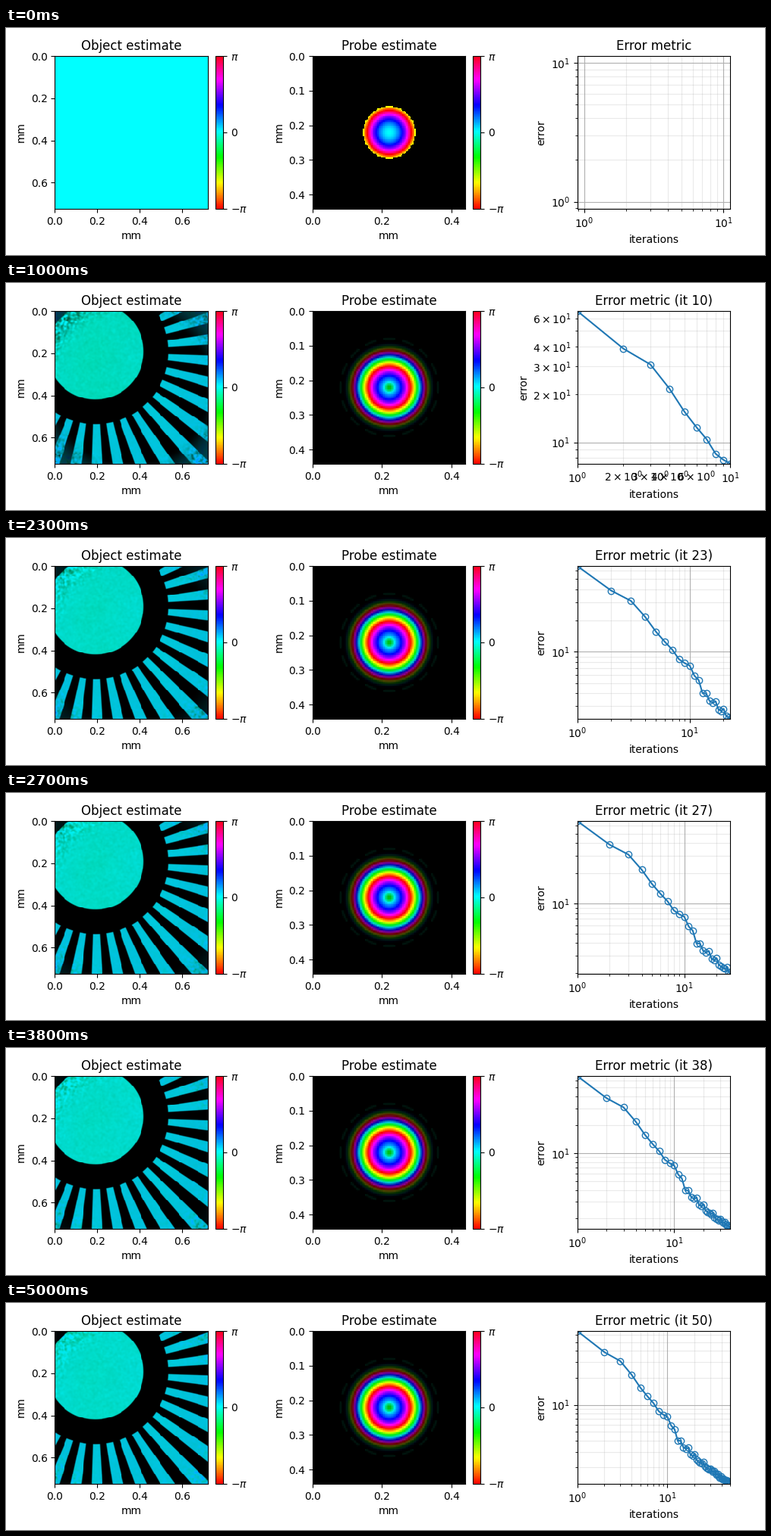
A matplotlib script for the animation above (5.1 s loop, 1000 by 300 pixels).

```python
import numpy as np
import matplotlib.pyplot as plt
from matplotlib.animation import FuncAnimation
from matplotlib.cm import ScalarMappable
from matplotlib.colors import Normalize, hsv_to_rgb

W, H, FRAMES = 1000, 300, 51
TOP, SIDE = 37.1, 201.7
plt.rcParams["font.family"] = "DejaVu Sans"

ERRORS = np.array([
    66.6, 38.7, 30.8, 21.7, 15.6, 12.45, 10.45, 8.49, 7.77, 7.35,
    5.87, 5.34, 3.98, 3.97, 3.36, 3.23, 3.33, 2.78, 2.69, 2.83,
    2.43, 2.34, 2.27, 2.21, 2.29, 2.06, 1.98, 1.95, 1.91, 1.95,
    1.86, 1.79, 1.82, 1.72, 1.66, 1.70, 1.60, 1.55, 1.59, 1.52,
    1.48, 1.50, 1.45, 1.43, 1.46, 1.40, 1.42, 1.37, 1.35, 1.32])


def grid(n, x0, y0):
    """Pixel offsets from a centre given relative to the panel corner."""
    p = (np.arange(n) + 0.5) * SIDE / n
    return np.meshgrid(p - x0, p - y0)


def smoothstep(lo, hi, x):
    t = np.clip((x - lo) / (hi - lo), 0, 1)
    return t * t * (3 - 2 * t)


def smooth_noise(rng, n, sigma):
    f = np.fft.fftfreq(n)
    kernel = np.exp(-2 * (np.pi * sigma) ** 2 * (f[:, None] ** 2 + f ** 2))
    field = np.fft.ifft2(np.fft.fft2(rng.standard_normal((n, n))) * kernel).real
    return field / field.std()


def to_rgb(hue_deg, value):
    hue = np.mod(hue_deg / 360, 1)
    return hsv_to_rgb(np.dstack([hue, np.ones_like(hue), np.clip(value, 0, 1)]))


# Object: a disc inside a ring of spokes, uncertain in the corners
N_OBJ = 210
PITCH = 2 * np.pi / 34
rng = np.random.default_rng(4)
fine_a, fine_b = (smooth_noise(rng, N_OBJ, 1.2) for _ in range(2))
coarse = smooth_noise(rng, N_OBJ, 14)
ox, oy = grid(N_OBJ, 53.7, 53.4)
o_rad, o_ang = np.hypot(ox, oy), np.arctan2(oy, ox)
disc = 1 - smoothstep(62.5, 64.5, o_rad)
turn = np.mod(o_ang - np.radians(4.5) + PITCH / 2, PITCH) - PITCH / 2
spokes = (smoothstep(-1, 1, o_rad * (PITCH / 4 - np.abs(turn)))
          * smoothstep(95, 97, o_rad))
shape = disc + spokes
cx, cy = grid(N_OBJ, SIDE / 2, SIDE / 2)
corner = smoothstep(92, 142, np.hypot(cx, cy))


def object_image(n):
    if n == 0:
        return to_rgb(np.full((N_OBJ, N_OBJ), 180.0), np.ones((N_OBJ, N_OBJ)))
    doubt = np.exp(-n / (0.9 + 16 * corner))
    t = n * 0.12
    noise = fine_a * np.cos(t) + fine_b * np.sin(t)
    rough = 0.01 + 0.22 * corner * (0.35 + 0.65 * np.exp(-n / 14))
    value = (shape * 0.86 * (1 - doubt) + 0.55 * doubt
             + noise * rough * (0.25 + 0.75 * shape) * (shape + doubt))
    hue = np.where(disc > 0, 175.5 - 8 * np.exp(-n / 12), 186)
    hue = hue + 0.8 * coarse + noise * (0.5 + 6 * corner) + 4 * doubt
    return to_rgb(hue, value)


# Probe: a curved-phase disc that spreads into rings around a bright spot
N_PROBE = 128
px, py = grid(N_PROBE, SIDE / 2, SIDE / 2)
p_rad, p_ang = np.hypot(px, py), np.arctan2(py, px)
start = (p_rad < 34.3) * np.exp(1j * 0.00365 * p_rad ** 2)
spot = np.exp(-(p_rad / 6) ** 2)
amp = (1 - smoothstep(32, 62, p_rad)) * (1 - 0.25 * spot)
final = amp * np.exp(1j * np.radians(5 + 0.2226 * p_rad ** 2 - 60 * spot))
halo = 0.08 * np.exp(-((p_rad - 64) / 1.6) ** 2) * (np.cos(16 * p_ang) > -0.2)
final = final + halo * np.exp(-0.35j)


def probe_image(n):
    w = 1 - 0.3 ** n
    field = (1 - w) * start + w * final
    value = np.abs(field) / np.abs(field).max()
    return to_rgb(np.degrees(np.angle(field)) + 180, value)


fig = plt.figure(figsize=(W / 100, H / 100), dpi=100, facecolor="white")


def add_axes(left, width=SIDE):
    return fig.add_axes([left / W, 1 - (TOP + SIDE) / H, width / W, SIDE / H])


def image_panel(left, title, image, size_mm, xticks, yticks):
    ax = add_axes(left)
    artist = ax.imshow(image, extent=(0, size_mm, size_mm, 0),
                       interpolation="nearest", aspect="auto")
    ax.set(title=title, xlabel="mm", ylabel="mm", xticks=xticks, yticks=yticks)
    bar = fig.colorbar(ScalarMappable(Normalize(-np.pi, np.pi), "hsv"),
                       cax=add_axes(left + SIDE + 10, 0.05 * SIDE))
    bar.set_ticks([-np.pi, 0, np.pi], labels=[r"$-\pi$", "0", r"$\pi$"])
    return artist


tenths = np.arange(5) / 10
obj = image_panel(64.4, "Object estimate", object_image(0), 0.7235,
                  2 * tenths[:4], 2 * tenths[:4])
probe = image_panel(403.7, "Probe estimate", probe_image(0), 0.441,
                    tenths[::2], tenths)

err_ax = add_axes(752.75)
err_ax.set(xscale="log", yscale="log", xlabel="iterations", ylabel="error")
err_ax.grid(True, which="major")
err_ax.grid(True, which="minor", color="#999999", alpha=0.2)
curve, = err_ax.plot([], [], "o-", color="C0", mfc="none")
EMPTY_LIMITS = (10 ** -0.05, 10 ** 1.05)


def update(n):
    obj.set_data(object_image(n))
    probe.set_data(probe_image(n))
    errors = ERRORS[:n]
    curve.set_data(np.arange(1, n + 1), errors)
    if n > 1:
        err_ax.set(xlim=(1, n), ylim=(errors.min(), errors.max()))
    else:
        err_ax.set(xlim=EMPTY_LIMITS, ylim=EMPTY_LIMITS)
    err_ax.set_title(f"Error metric (it {n})" if n else "Error metric")
    return obj, probe, curve


anim = FuncAnimation(fig, update, frames=FRAMES, interval=100,
                     repeat=True, repeat_delay=0, blit=False)
plt.show()
```
